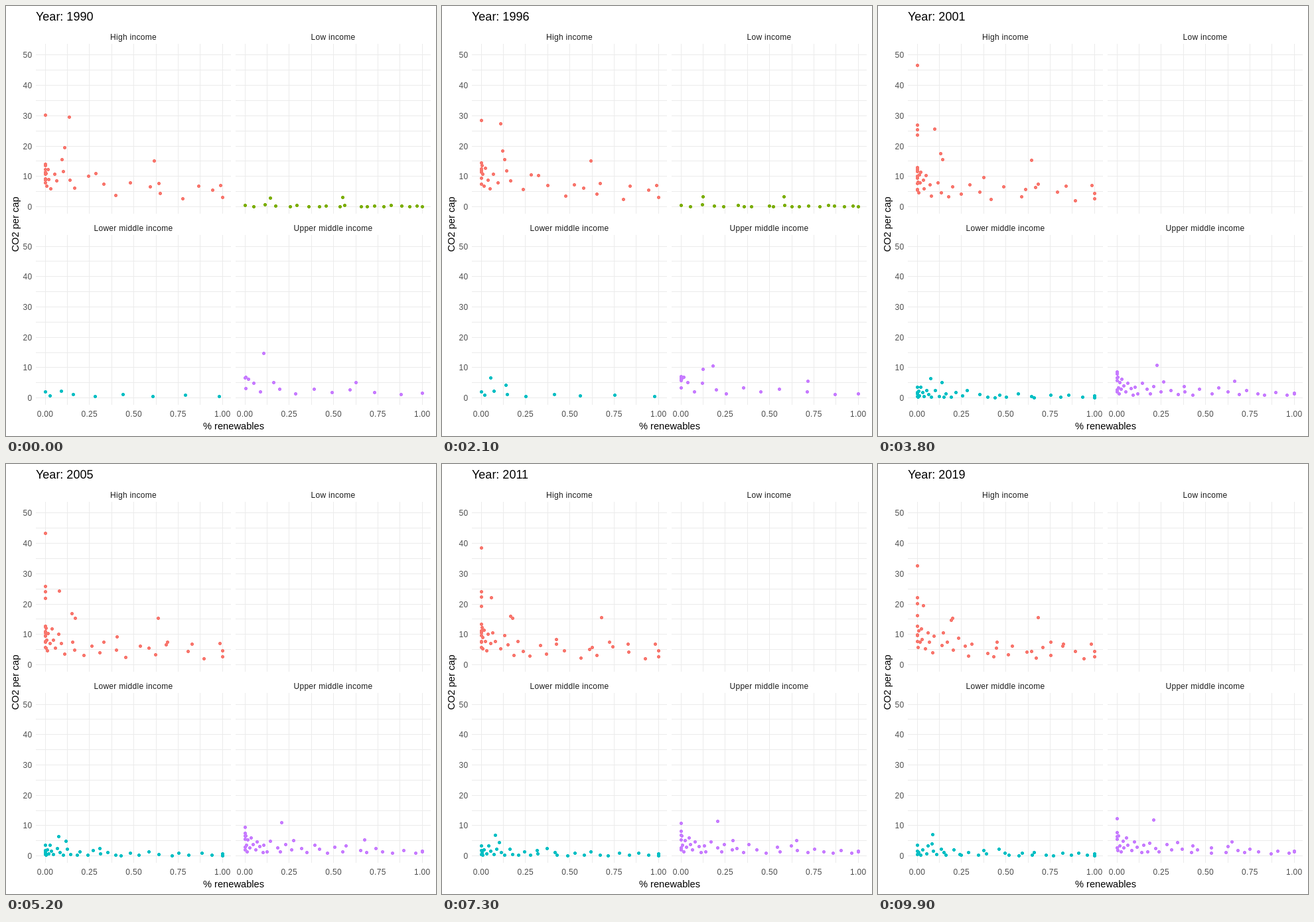
Animation, 648 px wide and 648 px high, one loop 10000 ms. Source, as an HTML page:

```html
<!DOCTYPE html>
<html lang="en">
<head>
<meta charset="utf-8">
<title>CO2 and renewables</title>
<style>
  html, body { margin: 0; width: 100%; height: 100%; overflow: hidden; background: #fff; }
  svg { display: block; font-family: "Liberation Sans", Arial, sans-serif; }
  path { shape-rendering: crispEdges; }
  .tick, .strip { font-size: 12px; letter-spacing: .3px; }
  .tick { fill: #4d4d4d; }
  .strip { fill: #1a1a1a; }
  .axis { font-size: 14.67px; }
  .title { font-size: 18px; }
  .mid { text-anchor: middle; }
  .end { text-anchor: end; }
</style>
</head>
<body>
<svg id="stage" width="648" height="648" viewBox="0 0 648 648">
  <text id="year" class="title" x="45" y="22">Year: 1990</text>
  <text class="axis mid" x="343" y="638">% renewables</text>
  <text class="axis mid" transform="translate(19 329) rotate(-90)">CO2 per cap</text>
</svg>
<script>
const FRAMES = 100, STEP = 100;
const JOIN = 7, SPLIT = 34;   // steps at which the 1992 and the 2000 data set in

const panels = [
  { id: "high", name: "High income", color: "#F8766D", x: 58.65, y: 302 },
  { id: "low", name: "Low income", color: "#7CAE00", x: 359.65, y: 302 },
  { id: "lower", name: "Lower middle income", color: "#00BFC4", x: 58.65, y: 590.21 },
  { id: "upper", name: "Upper middle income", color: "#C77CFF", x: 359.65, y: 590.21 }
];

// marks: outlying dots as [share %, CO2] at the start and at the end.
// crowd: n dots with share = rank ^ bend, bend easing from first to last value;
// CO2 lies in the range near (share 0) .. far (share 100), skewed towards its low end.
const periods = [
  {
    show: 0, hide: FRAMES, from: 0, to: 99,
    high: { marks: [
      [0, 30.1, 0, 22], [13, 29.5, 3, 19.5], [11, 19.4, 18, 14.7], [10, 15.5, 21.5, 15.3],
      [62, 15, 67, 15.6], [99, 7, 98, 6.8], [85, 6.8, 82, 6.8], [65, 7.6, 77, 7.4],
      [58, 6.5, 62, 4.4], [30, 11, 46, 7.4]
    ] }
  },
  {
    show: 0, hide: SPLIT, from: 0, to: 21,
    high: { crowd: { n: 26, bend: [4.6, 4], near: [6, 14], far: [2, 8], skew: 1 } },
    low: {
      marks: [[13.5, 2.8, 11.5, 3.2], [54, 3.1, 58, 3.2]],
      crowd: { n: 20, bend: [.85, .85], near: [0, .8], far: [0, .3], skew: 2 }
    },
    lower: { crowd: { n: 9, bend: [1.8, 2], near: [.1, 3], far: [.2, .6], skew: 1 } },
    upper: {
      marks: [[.5, 6.8, 0, 7], [10, 14.7, 12.5, 9.4], [62.5, 5.1, 72, 5.5]],
      crowd: { n: 14, bend: [2, 2.2], near: [1, 8], far: [.8, 1.8], skew: 1 }
    }
  },
  {
    show: JOIN, hide: SPLIT, from: 10, to: 21,
    lower: { marks: [[5, 9.7, 5, 6.6], [15, 5.4, 14, 4.2]] },
    upper: { marks: [[0, 7.5, 0, 5.8], [0, 6.2, 1, 6.6], [18.5, 12.8, 18.5, 10.5]] }
  },
  {
    show: SPLIT, hide: FRAMES, from: 38, to: 99,
    high: {
      marks: [[0, 46.5, 0, 32.5], [0, 25.3, 0, 20.2], [0, 23.6, 0, 16.1]],
      crowd: { n: 36, bend: [4.4, 2.2], near: [4, 13], far: [1.5, 6], skew: 1 }
    },
    lower: {
      marks: [[7.5, 6.3, 8, 7.1], [13, 5.1, 7.5, 4]],
      crowd: { n: 35, bend: [2.3, 1.6], near: [.2, 4], far: [.1, 1.4], skew: 2 }
    },
    upper: {
      marks: [[0, 8.6, 0, 12.3], [21, 10.8, 19, 11.9], [67.5, 5.6, 63, 4.7]],
      crowd: { n: 41, bend: [2.4, 2], near: [1, 9], far: [.8, 2], skew: 1.3 }
    }
  }
];

const stage = document.getElementById("stage");
const yearText = document.getElementById("year");

function add(tag, attrs, text) {
  const el = document.createElementNS("http://www.w3.org/2000/svg", tag);
  for (const k in attrs) el.setAttribute(k, attrs[k]);
  if (text) el.textContent = text;
  return stage.appendChild(el);
}

for (const p of panels) {
  const left = Math.round(p.x) - 14, base = Math.round(p.y), top = base - 245;
  let grid = "";
  for (let i = 0; i <= 8; i++) grid += `M${Math.round(p.x + 33.4 * i)} ${top}h1v256h-1z`;
  for (let i = 0; i <= 10; i++) grid += `M${left} ${Math.round(p.y - 22.87 * i)}h294v1h-294z`;
  add("path", { d: grid, fill: "#ebebeb" });
  add("text", { class: "strip mid", x: left + 147, y: base - 251 }, p.name);
  if (left < 100)
    for (let i = 0; i <= 5; i++)
      add("text", { class: "tick end", x: 39.5, y: Math.round(p.y - 45.74 * i) + 5 }, String(i * 10));
  if (base > 400)
    for (let i = 0; i <= 4; i++)
      add("text", { class: "tick mid", x: left + 14 + 66.8 * i, y: 619 }, (i / 4).toFixed(2));
  p.dots = add("path", { fill: p.color });
}

const mix = (a, b, u) => a + (b - a) * u;
const clamp = v => Math.min(1, Math.max(0, v));

// Seeded value in 0..1
function random(seed, n) {
  const s = Math.sin(seed * 127.1 + n * 311.7) * 43758.5453;
  return s - Math.floor(s);
}

// Yearly swing in -1..1, straight between whole years
function swing(seed, year) {
  const n = Math.floor(year);
  return 2 * mix(random(seed, n), random(seed, n + 1), year - n) - 1;
}

function crowdDot({ n, bend, near, far, skew }, i, u, seed, year) {
  const rank = clamp(mix(-.05, 1.05, (i + .5) / n));
  const s = rank ** mix(bend[0], bend[1], u);
  const level = ((i + 1) * .618 + random(seed, 0) * .2) % 1 ** 1;
  const r = level ** skew;
  const co2 = mix(mix(near[0], near[1], r), mix(far[0], far[1], r), Math.sqrt(s));
  return [100 * s + 12 * s * (1 - s) * swing(seed, year), co2 * (1 + .05 * swing(seed + 50, year))];
}

function markDot([x0, y0, x1, y1], u, seed, year) {
  const x = mix(x0, x1, u), s = x / 100;
  return [x + 12 * s * (1 - s) * swing(seed, year), mix(y0, y1, u)];
}

function dot(p, [x, y]) {
  const px = Math.round(p.x + 2.672 * x), py = Math.round(p.y - 4.574 * y);
  return `M${px - 1} ${py - 2}h3v1h1v3h-1v1h-3v-1h-1v-3h1z`;
}

function draw(step) {
  const year = 1990 + 29 * step / (FRAMES - 1);
  yearText.textContent = "Year: " + Math.floor(year);
  const active = periods.filter(t => step >= t.show && step < t.hide);
  panels.forEach((p, k) => {
    let d = "";
    for (const t of active) {
      const u = clamp((step - t.from) / (t.to - t.from));
      const { marks = [], crowd } = t[p.id] || {};
      marks.forEach((m, i) => d += dot(p, markDot(m, u, 300 + i, year)));
      if (crowd)
        for (let i = 0; i < crowd.n; i++) d += dot(p, crowdDot(crowd, i, u, k * 60 + i + 1, year));
    }
    p.dots.setAttribute("d", d);
  });
}

const start = performance.now();
let last = -1;
function tick() {
  const step = Math.floor(Math.max(0, performance.now() - start) / STEP) % FRAMES;
  if (step !== last) draw(last = step);
  requestAnimationFrame(tick);
}
tick();
</script>
</body>
</html>
```
